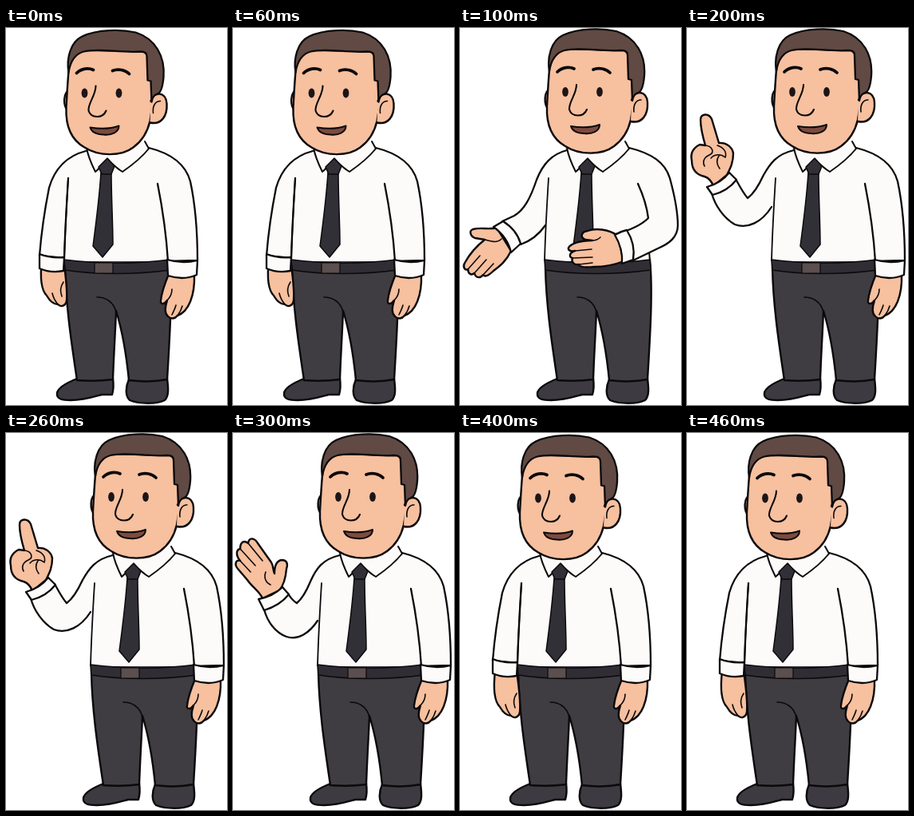
Animation, 277 px wide and 472 px high, one loop 500 ms. Source, as an HTML page with a canvas:

```html
<!DOCTYPE html>
<html lang="en">
<head>
<meta charset="utf-8">
<title>Gesturing man</title>
<style>
html, body { margin: 0; width: 100%; height: 100%; overflow: hidden; background: #fff; }
canvas { display: block; width: 277px; height: 472px; }
</style>
</head>
<body>
<canvas id="stage"></canvas>
<script>
const W = 277, H = 472, STEP = 100;
const INK = '#0b090b', SKIN = '#f7c09f', SHIRT = '#fdfbf9', HAIR = '#604a43';
const PANTS = '#3f3d42', BELT = '#302e34', TIE = '#323037', SHOE = '#3d3b41';

const canvas = document.getElementById('stage');
const ctx = canvas.getContext('2d');
const ratio = window.devicePixelRatio || 1;
canvas.width = Math.round(W * ratio);
canvas.height = Math.round(H * ratio);

const shape = (d, fill, width = 2.4) => {
  const path = new Path2D(d);
  if (fill) {
    ctx.fillStyle = fill;
    ctx.fill(path);
  }
  if (width) {
    ctx.lineWidth = width;
    ctx.stroke(path);
  }
};
const line = (d, width = 1.6) => shape(d, null, width);

const leftArms = {
  down: {
    sleeve: 'M133 154 C110 160 94 176 87 200 C81 230 77 260 75 285 L106 288 C107 255 109 220 111 188',
    cuff: 'M75 283 C85 287 95 288 106 287 L105 304 C95 306 84 305 75 301 Z',
    hand: 'M78 290 C75 316 78 329 84 335 C88 342 93 346 98 346 C102 350 108 348 109 341 C110 330 109 318 105 290 Z',
    creases: 'M98 346 C94 341 92 337 91 332 M105 318 C101 324 101 331 103 336'
  },
  offer: {
    sleeve: 'M134 153 C115 158 104 170 96 190 C88 214 80 228 68 235 L53 242 L76 271 C90 266 100 257 107 247',
    cuff: 'M42 249 L54 242 C65 249 73 259 76 270 L64 281 C61 268 53 257 42 249 Z',
    hand: 'M46 250 C36 253 27 249 16 252 C11 254 13 261 19 263 L31 265 C22 272 12 283 6 294 C3 299 6 304 10 302 C10 308 14 310 18 307 C20 314 26 313 29 309 C32 313 38 308 42 304 C50 298 58 292 64 279 Z',
    creases: 'M10 302 L25 285 M18 307 L33 290 M29 309 L42 295 M31 265 C39 267 46 270 52 264'
  },
  point: {
    sleeve: 'M134 153 C112 158 104 170 96 184 C90 197 83 208 76 213 C70 206 66 198 61 189 L31 207 C35 222 46 238 60 246 C76 252 94 243 106 224',
    cuff: 'M25 199 C36 196 46 190 53 181 L62 190 C55 199 44 206 32 209 Z',
    hand: 'M33 198 C31 192 28 188 22 186 C13 184 6 178 6 166 C4 157 8 150 16 146 L23 147 C20 137 17 126 17 115 C17 107 27 106 31 114 C34 124 37 134 40 144 C49 143 57 149 58 157 C58 169 54 176 50 184 Z',
    creases: 'M23 147 C32 148 35 156 28 159 C21 162 19 168 22 173 M38 147 C47 150 50 156 48 162 C42 157 34 158 30 163 M40 160 C36 166 38 172 41 176'
  },
  wave: {
    sleeve: 'M134 153 C112 158 104 170 97 186 C92 198 86 208 80 213 C75 210 72 206 69 201 L39 221 C43 236 53 250 67 255 C82 260 96 250 106 235',
    cuff: 'M32 208 C43 206 54 201 62 193 L70 202 C62 212 52 218 39 222 Z',
    hand: 'M37 207 C33 198 24 193 18 184 L6 170 C1 164 4 158 9 160 C3 153 4 146 9 145 C9 136 14 134 19 138 C20 130 27 131 31 138 L48 162 C51 167 50 172 52 176 C52 168 54 160 61 159 C68 159 69 164 67 170 C66 182 64 190 58 197 Z',
    creases: 'M9 160 L22 174 M9 145 L28 166 M19 138 L37 160 M41 174 C38 182 42 188 47 190'
  }
};

const rightArms = {
  down: {
    sleeve: 'M212 150 C240 157 258 170 264 192 C270 220 273 250 273 291 L236 292 C234 260 229 225 223 195',
    cuff: 'M235 290 C248 294 261 294 273 291 L272 309 C261 314 248 314 236 310 Z',
    hand: 'M237 308 C232 320 228 332 227 341 C226 346 231 347 235 341 C232 350 231 357 236 361 C240 365 245 364 248 360 C262 355 270 335 269 308 Z',
    creases: 'M235 341 C239 337 241 333 241 327 M241 359 C243 355 245 351 246 347 M248 360 C251 356 253 352 254 348'
  },
  bent: {
    sleeve: 'M212 150 C240 157 257 168 263 188 C269 210 273 228 273 247 C273 262 262 270 248 276 L217 291 L195 258 C210 254 226 248 236 238 C234 222 229 208 223 195',
    cuff: 'M194 259 C199 256 204 254 209 253 C216 264 219 278 217 290 L203 295 C204 282 200 269 194 259 Z',
    hand: 'M198 260 C186 252 170 250 160 254 C152 255 150 262 157 265 L166 266 C150 266 139 270 136 275 C135 279 140 280 144 279 C137 281 136 287 141 288 C139 293 143 297 149 296 C150 300 158 300 168 299 C180 299 190 298 205 292 Z',
    creases: 'M144 279 L165 277 M141 288 L166 287 M149 296 L166 294 M166 266 C171 266 174 264 176 262'
  }
};

const poses = [
  { left: 'down', right: 'down', x: -33, headX: -33.5, headY: 1.5, handY: 0 },
  { left: 'offer', right: 'bent' },
  { left: 'point', right: 'down' },
  { left: 'wave', right: 'down' },
  { left: 'down', right: 'down', x: -34, headX: -34, headY: 1.5, handY: 8 }
];

function drawLegs() {
  shape('M122 439 C112 443 98 450 97 457 C96 465 104 466 114 466 C130 466 142 462 153 459 L166 459 C168 452 168 446 167 439 Z', SHOE);
  shape('M187 440 C183 449 182 460 188 466 C200 471 222 471 232 466 C238 460 236 448 235 439 Z', SHOE);
  shape('M107 290 L238 290 C242 330 238 390 235 440 C220 443 203 443 187 441 C184 410 179 380 171 354 C170 380 168 410 167 440 C152 442 136 442 122 441 C116 400 108 350 107 300 Z', PANTS);
  line('M147 337 C157 337 168 342 171 356');
}

function drawTorso(showBuckle) {
  shape('M134 152 L110 172 L106 292 L237 292 L236 200 L212 150 Z', SHIRT, 0);
  line('M236 268 L238 291', 2);
  shape('M106 290 C145 295 195 296 238 290 L239 303 C195 309 145 309 107 303 Z', BELT, 1.5);
  if (showBuckle) shape('M144 294 H167 V307 H144 Z', '#5b504f', 1.2);
  shape('M152 181 L165 181 C165 212 167 245 167 271 L154 287 L142 273 C146 243 150 212 152 181 Z', TIE, 1.5);
}

function drawArm({ sleeve, cuff, hand, creases }, handY = 0) {
  ctx.save();
  ctx.translate(0, handY);
  shape(hand, SKIN);
  line(creases);
  ctx.restore();
  shape(sleeve, SHIRT, 2.3);
  shape(cuff, SHIRT, 2.3);
}

function drawCollar() {
  shape('M134 149 L145 180 L160 164 L179 180 C192 171 204 161 212 151 L207 141 Z', SHIRT, 0);
  line('M134 150 C136 162 141 172 145 180 C150 176 155 170 160 164 C166 170 172 176 179 180 C192 171 204 161 212 151 L207 142', 2);
  shape('M160 163 L169 173 L165 183 L153 183 L149 174 Z', TIE, 1.5);
}

function drawHead() {
  shape('M114 77 C105 76 104 98 112 103', SKIN);
  shape('M113 42 C111 60 110 80 109 98 C108 122 116 139 132 148 C150 159.5 178 159.5 193 148 C204 140 211 128 214 115 L218 90 L216 28 L125 26 Z', SKIN);
  shape('M215 90 C219 77 234 78 235 93 C236 109 228 120 214 117', SKIN);
  line('M227 90 C220 90 217 97 218 105');
  shape('M112 54 C109 37 114 16 129 9 C148 0 178 0 196 4 C221 12 233 34 231 60 C230 72 227 80 223 81 C219 82 217 86 216 91 L215 65 L211 64 L210 34 C210 30 207 28 202 28 C175 30 150 23 131 28 C120 31 114 41 112 54 Z', HAIR, 2.3);
  line('M122 55 C128 49 137 48 143 51 M167 52 C174 49 183 51 188 56', 3.8);
  ctx.fillStyle = '#1c1517';
  for (const [x, y] of [[132, 80], [175, 80]]) {
    ctx.beginPath();
    ctx.ellipse(x, y, 3.9, 6, 0, 0, Math.PI * 2);
    ctx.fill();
  }
  line('M146 71 C146 83 136 93 137 102 C140 112 155 112 159 102', 2.1);
  shape('M139 123 C151 125 164 125 175 121 C175 129 166 133 156 132 C147 132 141 129 139 123 Z', '#7c4b3f', 2);
}

function draw({ left, right, x = 0, headX = 0, headY = 0, handY = 0 }) {
  ctx.setTransform(canvas.width / W, 0, 0, canvas.height / H, 0, 0);
  ctx.fillStyle = '#fff';
  ctx.fillRect(0, 0, W, H);
  ctx.strokeStyle = INK;
  ctx.lineJoin = ctx.lineCap = 'round';

  ctx.save();
  ctx.translate(x, 0);
  drawLegs();
  drawTorso(right === 'down');
  drawArm(leftArms[left], handY);
  line('M111 188 C109 220 107 255 106 291', 1.8);
  drawArm(rightArms[right]);
  drawCollar();
  ctx.restore();

  ctx.save();
  ctx.translate(headX, headY);
  drawHead();
  ctx.restore();
}

const start = performance.now();
function tick() {
  const elapsed = performance.now() - start;
  draw(poses[Math.floor(elapsed / STEP) % poses.length]);
  requestAnimationFrame(tick);
}
tick();
</script>
</body>
</html>
```
